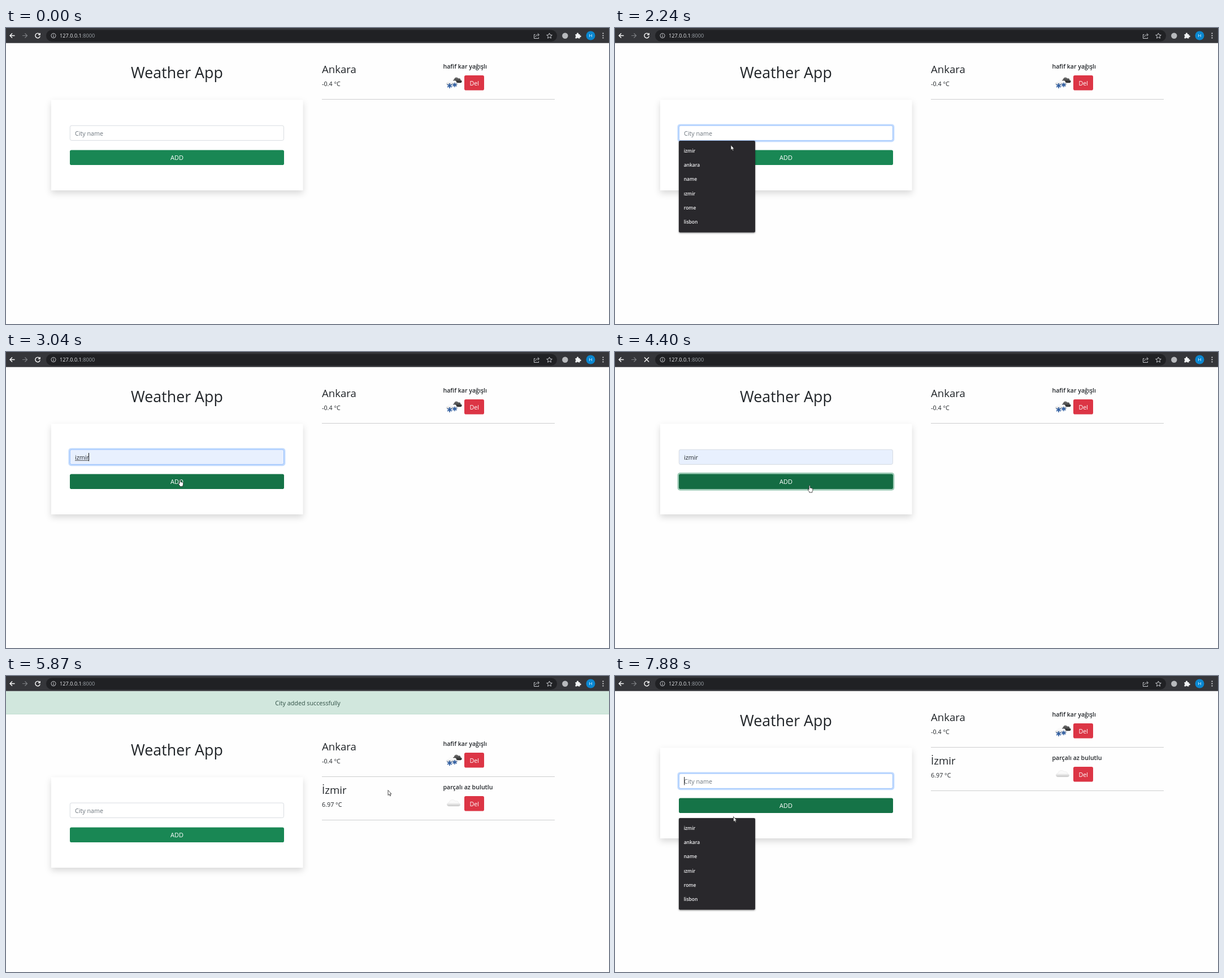
Write an HTML page that moves like this. It is 1067x525 px and loops after 8000 ms.

```html
<!DOCTYPE html>
<html lang="en">
<head>
<meta charset="utf-8">
<title>Weather App</title>
<style>
  html, body { margin: 0; width: 100%; height: 100%; overflow: hidden; background: #fefefe; }
  svg { display: block; width: 1067px; height: 525px; }
  text { font: 10.75px "Open Sans", "Noto Sans", sans-serif; fill: #212529; }
  .mid { text-anchor: middle; }
  .white { fill: #fff; }
  .h1 { font-size: 26.8px; font-weight: 500; }
  .h3 { font-size: 18.6px; font-weight: 500; }
  .desc { font-size: 10.6px; font-weight: 600; }
  .url { font-size: 9.2px; fill: #e8eaed; }
  .item { font-size: 8.5px; font-weight: 600; fill: #f1f1f3; }
  .icon { fill: none; stroke: #dadce0; stroke-width: 1.2; }
  #card { filter: drop-shadow(0 5.6px 5.6px rgba(0, 0, 0, .15)); }
  #list { filter: drop-shadow(0 1px 1.5px rgba(0, 0, 0, .5)); }
</style>
</head>
<body>
<svg viewBox="0 0 1067 525">
  <defs>
    <linearGradient id="pale" x2="0" y2="1">
      <stop offset=".45" stop-color="#fafafa"/><stop offset="1" stop-color="#c4c4c4"/>
    </linearGradient>
    <linearGradient id="dark" x2="0" y2="1">
      <stop offset="0" stop-color="#777"/><stop offset="1" stop-color="#222"/>
    </linearGradient>
    <path id="cloud" d="M4 12C-1 12-1 6 4 5.5 5 0 12-1 15 3 19 2 21 4 20.5 6.5 25 6.5 25 12 20 12Z"/>
    <path id="flake" d="M0-4.5V4.5M-4-2.2 4 2.2M-4 2.2 4-2.2" stroke="#2c5b9f" stroke-width="1.7"/>
    <g id="del">
      <rect x="811" y="84" width="35" height="26.5" rx="2.8" fill="#dc3545"/>
      <text class="mid white" x="828.7" y="101.5">Del</text>
      <path d="M559 126.5H971" stroke="#c8c9ca" stroke-width=".9"/>
    </g>
  </defs>

  <g id="page">
    <text class="h1 mid" x="302.5" y="88.5">Weather App</text>
    <rect id="card" x="80" y="127.5" width="445.5" height="160.5" fill="#fff"/>

    <rect id="ring" x="110.4" y="170.4" width="384" height="31.8" rx="5" fill="#c2dbfe"/>
    <rect id="input" x="113.3" y="173.1" width="378.2" height="26.3" rx="2.8"/>
    <text id="value" x="122" y="191"></text>
    <path id="underline" d="M122 192.5H146" stroke="#333" stroke-width=".8"/>
    <path id="caret" stroke="#111"/>

    <rect id="btnRing" x="110.4" y="213.8" width="384" height="32" rx="5" fill="#9ecbb6"/>
    <rect id="btn" x="113" y="216.5" width="379" height="26.5" rx="2.8"/>
    <text class="mid white" x="302.5" y="234" style="font-size:11px">ADD</text>

    <text class="h3" x="559" y="80">Ankara</text>
    <text x="559" y="102.5">-0.4 °C</text>
    <text class="desc" x="773.5" y="72">hafif kar yağışlı</text>
    <use href="#cloud" transform="translate(790 87) scale(.7 .85)" fill="url(#dark)"/>
    <use href="#cloud" transform="translate(778.5 91) scale(.9 .85)" fill="url(#pale)"/>
    <use href="#flake" x="785" y="102.5"/>
    <use href="#flake" transform="translate(794 101) scale(.9)"/>
    <use href="#del"/>

    <g id="second">
      <text class="h3" x="559" y="157">İzmir</text>
      <text x="559" y="179.7">6.97 °C</text>
      <text class="desc" x="773.5" y="149.2">parçalı az bulutlu</text>
      <use href="#cloud" transform="translate(780 167)" fill="url(#pale)" stroke="#ddd" stroke-width=".4"/>
      <use href="#del" y="77"/>
    </g>
  </g>

  <g id="alert">
    <rect y="27" width="1067" height="41" fill="#d1e7dd"/>
    <path d="M0 67.6H1067" stroke="#badbcc" stroke-width=".8"/>
    <text class="mid" x="534" y="51.6" style="fill:#2f4f44">City added successfully</text>
  </g>

  <g id="list">
    <rect x="113" y="200" width="135" height="162.5" rx="2" fill="#29282c"/>
    <rect id="hot" x="113" y="205.5" width="135" height="25.2" fill="#45444a"/>
  </g>

  <rect width="1067" height="26.7" fill="#35363a"/>
  <rect x="71" y="3.5" width="904" height="20.5" rx="10.2" fill="#202124"/>
  <g class="icon">
    <path d="M15.5 13.5H7.5M11 9.5 7 13.5 11 17.5" stroke="#fff" stroke-width="1.4"/>
    <path d="M29 13.5H37M33.5 9.5 37.5 13.5 33.5 17.5" stroke="#7d7f83"/>
    <path id="reload" d="M59 10.5A4.2 4.2 0 1 0 60.2 14.5M60.2 9V12H57" stroke="#fff" stroke-width="1.4"/>
    <path id="stop" d="M52 9.5 60 17.5M60 9.5 52 17.5" stroke="#fff" stroke-width="1.4"/>
    <circle cx="84" cy="13.7" r="4" stroke-width=".9"/>
    <path d="M84 13.2V16M84 11.2V12.2" stroke-width="1"/>
    <path d="M936.5 11.5H934.5V18.5H942.5V16.5M937 16C937 13 939 12 943 12M940.8 9.5 943.5 12 940.8 14.5" stroke-width=".9"/>
    <path d="M961.5 9 962.9 12.2 966.3 12.5 963.7 14.8 964.5 18.2 961.5 16.4 958.5 18.2 959.3 14.8 956.7 12.5 960.1 12.2Z" stroke-width=".9"/>
  </g>
  <circle cx="989.3" cy="13.8" r="5.2" fill="#b8babd"/>
  <path d="M1007.5 11H1010A1.7 1.7 0 1 1 1013 11H1015.5V13.3A1.6 1.6 0 1 1 1015.5 16.2V18.5H1012.8A1.5 1.5 0 0 0 1010 18.5H1007.5V16A1.5 1.5 0 0 0 1007.5 13.3Z" fill="#f1f3f4"/>
  <circle cx="1034.5" cy="13.5" r="8" fill="#0b87d0"/>
  <text class="mid white" x="1034.5" y="16.4" style="font-size:8px">H</text>
  <path d="M1056.5 9.5v0M1056.5 13.5v0M1056.5 17.5v0" stroke="#e8eaed" stroke-width="2.1" stroke-linecap="round"/>
  <text class="url" x="95" y="17">127.0.0.1<tspan fill="#9aa0a6">:8000</tspan></text>

  <path id="cursor" stroke="#222" stroke-width=".8" stroke-linejoin="round"/>
</svg>

<script>
const $ = id => document.getElementById(id);
const set = (id, name, v) => $(id).setAttribute(name, v);
const show = (id, on) => { $(id).style.display = on ? '' : 'none'; };

['izmir', 'ankara', 'name', 'ızmir', 'rome', 'lisbon'].forEach((word, i) => {
  $('list').insertAdjacentHTML('beforeend',
    `<text class="item" x="121.7" y="${221 + i * 25.2}">${word}</text>`);
});

const shapes = {
  arrow: 'M0 0V9L2 7.2 3.5 10.3 4.9 9.7 3.5 6.7H6Z',
  hand: 'M-1 7V1Q0-.6 1 1V4.6Q2 4 2.6 5 3.6 4.4 4.2 5.5 5.4 5 5.6 6.4V9Q5.4 10.5 4.7 11V12.6H-.5V11.3L-3.2 7.6Q-3.2 5.8-1 7.6Z',
  beam: 'M0 0H1.7L2.2.5 2.7 0H4.4M2.2.5V10.5M0 11H1.7L2.2 10.5 2.7 11H4.4'
};

// Pointer stops: time, x, y, shape
const stops = [
  [510, 664, 407, 'arrow'], [640, 540, 345, 'arrow'], [770, 420, 275, 'arrow'], [900, 330, 219, 'hand'],
  [1040, 262, 204, 'arrow'], [1170, 200, 181, 'beam'],
  [2110, 203, 192, 'beam'], [2240, 205, 207.5, 'arrow'], [2360, 206, 215, 'arrow'],
  [2640, 240, 221, 'hand'], [2770, 285, 221, 'hand'], [2900, 303, 220, 'hand'], [3040, 308, 226, 'hand'],
  [3470, 312, 231, 'hand'], [3740, 324, 233, 'hand'], [3880, 333, 235, 'hand'], [4010, 343, 237, 'hand'],
  [4400, 344.3, 236.5, 'hand'], [4670, 364, 233, 'arrow'],
  [4820, 420, 238, 'arrow'], [4950, 482, 243, 'arrow'], [5080, 535, 246, 'arrow'], [5200, 563.5, 247, 'arrow'],
  [5340, 580, 251, 'arrow'], [5470, 600, 252, 'arrow'], [5600, 609.5, 248, 'arrow'],
  [5740, 645, 228, 'arrow'], [5870, 676, 202.5, 'arrow'], [6020, 692, 198, 'arrow'],
  [6150, 298.5, 262, 'arrow'], [6290, 190, 255, 'arrow'], [6420, 88.5, 239.5, 'arrow'],
  [6560, 206, 229, 'beam'], [6700, 207.5, 229, 'beam'], [7220, 209, 230.5, 'beam'],
  [7360, 213, 234, 'beam'], [7490, 217.5, 238, 'hand'], [7760, 213.5, 241, 'hand'], [7880, 209.5, 249.5, 'arrow']
];

function draw(t) {
  const within = (...spans) => spans.some(([a, b]) => t >= a && t < b);
  const alert = within([4560, 7620]);
  const added = t >= 4560;
  const focus = within([1310, 3230], [6840, 8000]);
  const filled = within([2360, 4560]);
  const pressed = within([3230, 4560]);
  const hover = within([900, 1040], [2640, 4560], [7760, 8000]);

  set('page', 'transform', `translate(0 ${alert ? 52 : 0})`);
  show('alert', alert);
  show('second', added);

  show('ring', focus);
  set('input', 'fill', filled ? '#e8f0fe' : '#fff');
  set('input', 'stroke', focus ? '#86b7fe' : '#ced4da');
  set('input', 'stroke-width', .8);
  $('value').textContent = filled ? 'izmir' : 'City name';
  $('value').style.fill = filled ? '#212529' : '#6c757d';
  show('underline', within([2510, 3230]));
  show('caret', within([1310, 1840], [2510, 3230], [6840, 7360], [7760, 8000]));
  set('caret', 'd', `M${filled ? 146.5 : 122.8} 179V193.5`);

  show('btnRing', pressed);
  set('btn', 'fill', pressed ? '#146c43' : hover ? '#157347' : '#198754');

  show('list', within([1440, 2510], [6960, 8000]));
  set('list', 'transform', `translate(0 ${added ? 52 : 0})`);
  show('hot', within([2360, 2510]));

  const loading = within([3350, 4670]);
  show('reload', !loading);
  show('stop', loading);

  const stop = stops.filter(s => s[0] <= t).pop();
  show('cursor', stop);
  if (stop) {
    const [, x, y, kind] = stop;
    set('cursor', 'd', shapes[kind]);
    set('cursor', 'fill', kind === 'beam' ? 'none' : '#fff');
    set('cursor', 'transform', `translate(${x} ${y})`);
  }
}

const start = performance.now();
function tick() {
  draw((performance.now() - start) % 8000);
  requestAnimationFrame(tick);
}
tick();
</script>
</body>
</html>
```
